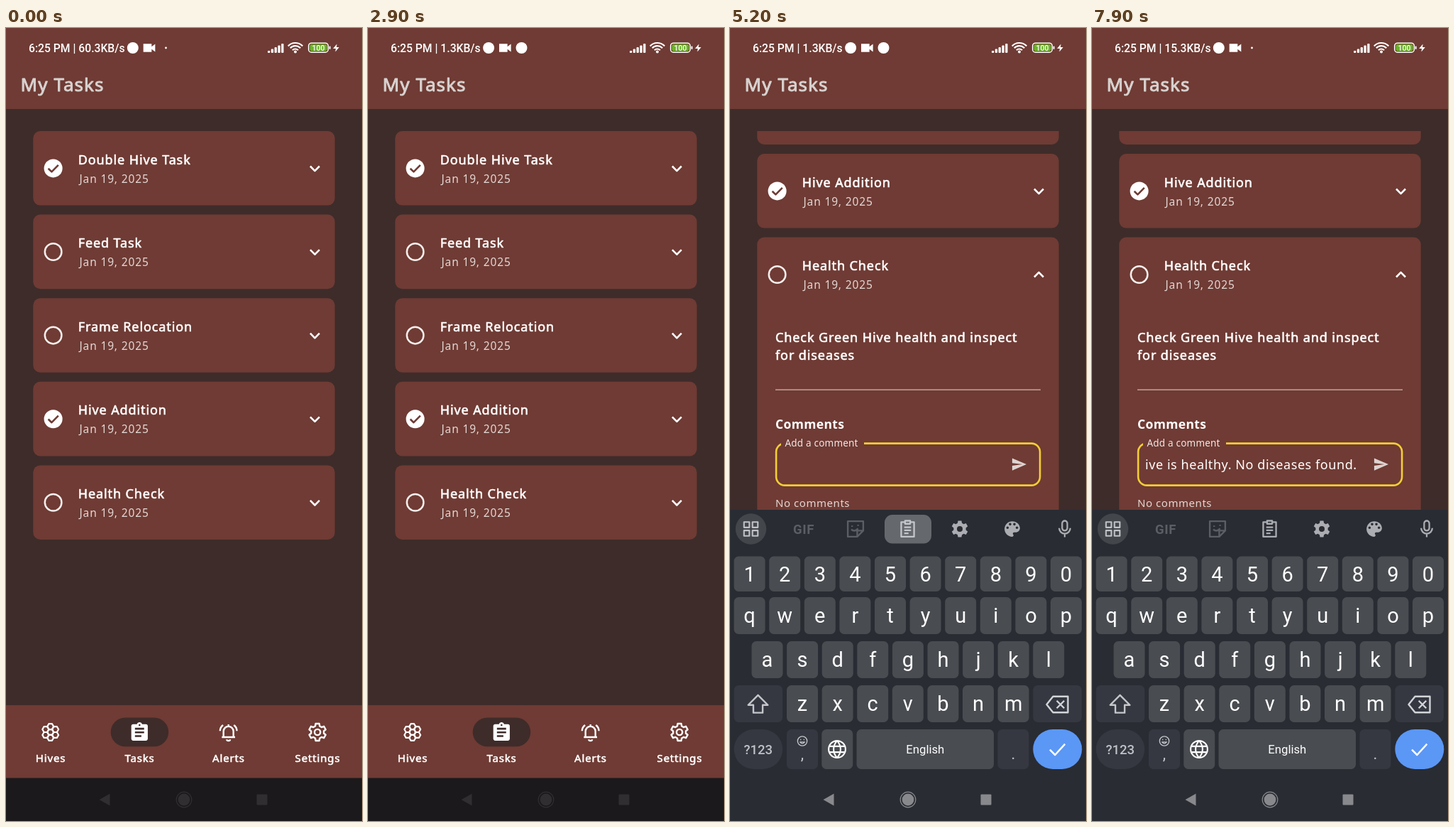
These frames come from a looping animation (502x1116 px, 8 s). An HTML page with a canvas:

```html
<!DOCTYPE html>
<html lang="en">
<head>
<meta charset="utf-8">
<title>My Tasks</title>
<style>
html, body { margin: 0; width: 100%; height: 100%; overflow: hidden; background: #3e2c2a; }
canvas { display: block; width: 502px; height: 1116px; }
</style>
</head>
<body>
<canvas id="stage"></canvas>
<script>
const W = 502, H = 1116, LOOP = 8000;
const canvas = document.getElementById('stage');
const ctx = canvas.getContext('2d');
const dpr = window.devicePixelRatio || 1;
canvas.width = W * dpr;
canvas.height = H * dpr;

const APP = '"Noto Sans", "Open Sans", sans-serif';
const SYS = 'Roboto, Inter, sans-serif';
const RUST = '#6f3b34', BROWN = '#3e2c2a', WHITE = '#fff', PALE = '#e3d7d4';
const PANEL = '#292c33', KEY = '#494c50', DARKKEY = '#353841', BLUE = '#5b97f5', GREY = '#abadb2', FAINT = '#5b5e64';
const LIST_TOP = 145, LIST_END = 953, CARD = 104.6, GAP = 13, KB_TOP = 678;

const PATHS = {
  clip: 'M19 3h-4.2C14.4 1.8 13.3 1 12 1s-2.4.8-2.8 2H5c-1.1 0-2 .9-2 2v14c0 1.1.9 2 2 2h14c1.1 0 2-.9 2-2V5c0-1.1-.9-2-2-2zm-7 0c.6 0 1 .4 1 1s-.4 1-1 1-1-.4-1-1 .4-1 1-1zm2 14H7v-2h7v2zm3-4H7v-2h10v2zm0-4H7V7h10v2z',
  clipLine: 'M9 4H4.5V21H19.5V4H15M9 2.5H15V6H9zM8 10H16M8 13.5H16M8 17H13',
  clipBare: 'M9 4H4.5V21H19.5V4H15M9 2.5H15V6.5H9z',
  bell: 'M6 18V11a6 6 0 0 1 12 0V18M4 18H20M12 2.5V5M10 20.8a2 1.6 0 0 0 4 0M1.8 10.5a9 9 0 0 1 3.7-7M22.2 10.5a9 9 0 0 0-3.7-7',
  send: 'M2 21L23 12 2 3V10l15 2-15 2z',
  palette: 'M12 3c-5 0-9 4-9 9s4 9 9 9c.8 0 1.5-.7 1.5-1.5 0-.4-.2-.7-.4-1-.2-.3-.4-.6-.4-1 0-.8.7-1.5 1.5-1.5H16c2.8 0 5-2.2 5-5 0-4.4-4-8-9-8zM6.5 12a1.5 1.5 0 1 1 0-3 1.5 1.5 0 0 1 0 3zM9.5 8a1.5 1.5 0 1 1 0-3 1.5 1.5 0 0 1 0 3zM14.5 8a1.5 1.5 0 1 1 0-3 1.5 1.5 0 0 1 0 3zM17.5 12a1.5 1.5 0 1 1 0-3 1.5 1.5 0 0 1 0 3z',
  mic: 'M9 5.5a3 3 0 0 1 6 0v5.5a3 3 0 0 1-6 0zM5.5 11a6.5 6.5 0 0 0 13 0M12 17.5V21.5',
  pencil: 'M3 17.2V21h3.8L17.8 9.9l-3.7-3.7zM20.7 7c.4-.4.4-1 0-1.4l-2.3-2.3c-.4-.4-1-.4-1.4 0l-1.9 1.8 3.8 3.8z',
  pin: 'M16 9V4h1V2H7v2h1v5c0 1.7-1.3 3-3 3v2h6v7l1 1 1-1v-7h6v-2c-1.7 0-3-1.3-3-3z',
  shift: 'M12 3L2.5 12.5H7.5V20H16.5V12.5H21.5z',
  erase: 'M8 4.5H22V19.5H8L2 12zM11.5 8.5l7 7M18.5 8.5l-7 7',
  globe: 'M2 12a10 10 0 1 1 20 0 10 10 0 0 1-20 0zM12 2c-5.5 6-5.5 14 0 20M12 2c5.5 6 5.5 14 0 20M3 8.5H21M3 15.5H21',
  smile: 'M2 12a10 10 0 1 1 20 0 10 10 0 0 1-20 0zM7 14q5 6 10 0zM8.5 8v2M15.5 8v2',
  sticker: 'M3 3H21V14L14 21H3zM21 14H14V21M8 8v1.5M15 7v1.5M7 12.5q4 3.5 8-1',
  apps: 'M3 3H10V10H3zM14 3H21V10H14zM3 14H10V21H3zM14 14H21V21H14z',
  back: 'M21 12H4M12 4L4 12L12 20',
  tick: 'M4 12.5L9.5 18L20 6.5',
  bolt: 'M14 2L4 14H11L10 22L20 10H13z',
  camera: 'M2 5H16V10L22 5.5V18.5L16 14V19H2z'
};
for (const k in PATHS) PATHS[k] = new Path2D(PATHS[k]);

const clamp = v => Math.max(0, Math.min(1, v));
const ease = p => p < .5 ? 4 * p ** 3 : 1 - (2 - 2 * p) ** 3 / 2;
const ramp = (t, from, to) => ease(clamp((t - from) / (to - from)));
const mix = (a, b, p) => a + (b - a) * p;

// heft outlines the glyphs for weights between regular and bold.
function text(s, x, y, size, { font = APP, weight = 400, heft = 0, color = WHITE, gap = 0, align = 'left' } = {}) {
  ctx.font = `${weight} ${size}px ${font}`;
  ctx.letterSpacing = gap + 'px';
  ctx.textAlign = align;
  ctx.fillStyle = ctx.strokeStyle = color;
  ctx.fillText(s, x, y);
  if (heft) {
    ctx.lineWidth = heft;
    ctx.strokeText(s, x, y);
  }
}

function box(x, y, w, h, r, color) {
  ctx.fillStyle = color;
  ctx.beginPath();
  ctx.roundRect(x, y, w, h, r);
  ctx.fill();
}

function disc(x, y, r, color, line) {
  ctx.beginPath();
  ctx.arc(x, y, r, 0, 7);
  paint(color, line);
}

function paint(color, line, path) {
  ctx.fillStyle = ctx.strokeStyle = color;
  ctx.lineWidth = line || 1;
  const args = path ? [path] : [];
  if (line) ctx.stroke(...args); else ctx.fill(...args, 'evenodd');
}

function poly(points, color, line, open) {
  ctx.beginPath();
  points.forEach(([x, y]) => ctx.lineTo(x, y));
  if (!open) ctx.closePath();
  paint(color, line);
}

// Icons live on a 24-unit grid; a line width makes them outlined.
function icon(name, x, y, size, color, line) {
  const k = size / 24;
  ctx.save();
  ctx.translate(x - size / 2, y - size / 2);
  ctx.scale(k, k);
  paint(color, line && line / k, PATHS[name]);
  ctx.restore();
}

function clipped(x, y, w, h, draw) {
  ctx.save();
  ctx.beginPath();
  ctx.rect(x, y, w, h);
  ctx.clip();
  draw();
  ctx.restore();
}

const polar = (x, y, r, a) => [x + r * Math.cos(a), y + r * Math.sin(a)];

function gear(x, y, r, color, line) {
  const pts = [];
  for (let i = 0; i < 6; i++) {
    const a = i * Math.PI / 3 + Math.PI / 6;
    for (const [k, d] of [[.74, -.36], [1, -.21], [1, .21], [.74, .36]]) pts.push(polar(x, y, r * k, a + d));
  }
  poly(pts, color, line);
  disc(x, y, r * .34, line ? color : PANEL, line);
}

function comb(x, y, r) {
  const hex = (cx, cy) => poly([0, 1, 2, 3, 4, 5].map(i => polar(cx, cy, r, i * Math.PI / 3)), WHITE, 2.2);
  hex(x, y);
  for (let i = 0; i < 6; i++) hex(...polar(x, y, r * Math.sqrt(3), Math.PI / 6 + i * Math.PI / 3));
}

function statusBar(t) {
  const speed = t < 1300 ? '60.3' : t < 5300 ? '1.3' : '15.3';
  const busy = speed === '1.3', shift = busy ? -8.7 : 0;
  text(`6:25 PM | ${speed}KB/s`, 32, 33.5, 15.7, { font: SYS, weight: 500 });
  disc(178.8 + shift, 28, 8, WHITE);
  icon('camera', 202 + shift, 28, 20, WHITE);
  if (busy) disc(216.5, 28, 8, WHITE); else disc(225.5, 28, 1.4, WHITE);

  for (let i = 0; i < 5; i++) box(369 + i * 4.8, 32 - i * 2.5, 3.3, 3 + i * 2.5, 1, WHITE);
  for (const r of [5.5, 9.8, 14]) {
    ctx.beginPath();
    ctx.arc(408, 35, r, -Math.PI * .76, -Math.PI * .24);
    paint(WHITE, 2.2);
  }
  disc(408, 33.5, 2, WHITE);
  ctx.beginPath();
  ctx.roundRect(426.7, 21.2, 27.6, 13, 4);
  paint(WHITE, 1.5);
  box(428.5, 23, 24, 9.4, 2.3, '#68b526');
  box(455.6, 25.5, 2, 4.5, 1, WHITE);
  text('100', 440.5, 31.6, 10.5, { font: SYS, weight: 500, align: 'center' });
  icon('bolt', 465.5, 28, 13, WHITE);
}

function header(t) {
  box(0, 0, W, 114, 0, RUST);
  statusBar(t);
  text('My Tasks', 20.5, 88.5, 26, { heft: .9, color: '#d8d3d1', gap: 1.1 });
}

const strong = { heft: .6, gap: .9 };
const body = { color: PALE, gap: .8 };

function rule(y) { box(64, y - .7, 374, 1.4, 0, '#d2b9ae'); }

function commentsTitle(y) { text('Comments', 64, y, 17.5, { weight: 700, gap: .35 }); }

function comment(name, time, line, y) {
  text(name, 64, y, 15, { weight: 700, gap: .3 });
  text(time, 438, y, 14, { color: '#cdb9b4', gap: .9, align: 'right' });
  text(line, 64.5, y + 35, 15, body);
}

function queenDetails(y) {
  text('Check for queen health', 64, y + 147.7, 18, strong);
  rule(y + 190);
  commentsTitle(y + 245);
  comment('Tovak', '15:36', 'Great!', y + 293.5);
  comment('You', '15:35', 'Queen is healthy.', y + 381.5);
}

function field(y, focus, pasted) {
  ctx.save();
  if (focus) {
    ctx.beginPath();
    ctx.rect(0, y - 10, W, 90);
    ctx.rect(mix(130, 72, focus), y - 9, mix(0, 117, focus), 18);
    ctx.clip('evenodd');
  }
  ctx.beginPath();
  ctx.roundRect(65.1, y + .5, 372, 59, 12);
  paint(focus > .3 ? '#f3ce35' : '#93766b', mix(1.3, 2.6, focus));
  ctx.restore();
  text('Add a comment', 77.5, y + mix(36.5, 5, focus), mix(18, 13.5, focus), { color: '#f0e8e6', gap: mix(.45, .2, focus) });
  icon('send', 407.5, y + 30, 23, '#ddd3d0');
  if (pasted) text('ive is healthy. No diseases found.', 75, y + 36.5, 18, { gap: .57 });
}

function healthDetails(y, t) {
  text('Check Green Hive health and inspect', 64, y + 147.7, 18, strong);
  text('for diseases', 64, y + 172.2, 18, strong);
  rule(y + 214.5);
  commentsTitle(y + 269.3);
  field(y + 289.5, ramp(t, 4200, 4400), t >= 6000);
  text('No comments', 64, y + 379.5, 15, { color: PALE, gap: .55 });
}

function card(task, y, h, t) {
  box(38.3, y, 425.4, h, 10, RUST);
  const cy = y + 52.4;
  if (task.done) {
    disc(66.6, cy, 13, WHITE);
    poly([[59.6, cy + .3], [64.4, cy + 5], [73.8, cy - 4.6]], RUST, 2.6, true);
  } else {
    disc(66.6, cy, 11.8, '#f6efed', 2.5);
  }
  text(task.name, 101.7, y + 46.5, 18, strong);
  text('Jan 19, 2025', 103.5, y + 72.6, 15.5, { color: PALE, gap: .85 });
  ctx.save();
  ctx.translate(435.5, cy + .3);
  ctx.rotate(Math.PI * task.open);
  poly([[-6.5, -3.2], [0, 3.4], [6.5, -3.2]], WHITE, 2.6, true);
  ctx.restore();
  if (task.open) clipped(38, y + CARD, 426, h - CARD, () => task.details(y, t));
}

function list(t, kb) {
  const tasks = [
    { name: 'Double Hive Task', done: true, full: 447, details: queenDetails, open: ramp(t, 200, 600) - ramp(t, 2000, 2400) },
    { name: 'Feed Task', open: 0 },
    { name: 'Frame Relocation', open: 0 },
    { name: 'Hive Addition', done: true, open: 0 },
    { name: 'Health Check', full: 410, details: healthDetails, open: ramp(t, 3300, 3750) }
  ];
  const heights = tasks.map(k => k.open ? mix(CARD, k.full, k.open) : CARD);
  const overflow = LIST_TOP + 4 * (CARD + GAP) + heights[4] - LIST_END;
  let y = LIST_TOP - Math.max(0, overflow) - 248.4 * kb;
  clipped(0, LIST_TOP, W, LIST_END - LIST_TOP, () => tasks.forEach((k, i) => {
    card(k, y, heights[i], t);
    y += heights[i] + GAP;
  }));
}

function tabs() {
  box(0, LIST_END, W, 103, 0, RUST);
  box(147.7, 970.5, 81.5, 40.8, 20.4, BROWN);
  comb(62.7, 991, 4.55);
  icon('clip', 188.3, 991.3, 31, WHITE);
  icon('bell', 313.7, 991, 28, WHITE, 2.4);
  gear(439.2, 991, 12.2, WHITE, 2.4);
  ['Hives', 'Tasks', 'Alerts', 'Settings'].forEach((s, i) =>
    text(s, 63 + i * 125.5, 1033.3, 15, { heft: .6, gap: .85, align: 'center' }));
  box(0, 1055.5, W, 61, 0, '#1b191b');
}

function systemKeys(lit) {
  const c = lit ? '#88898d' : '#302e30';
  poly([[131.5, 1086], [146.5, 1077.5], [146.5, 1094.5]], c);
  disc(251, 1086, 8.4, c);
  disc(251, 1086, 10.8, c, 1.2);
  box(353.5, 1078.5, 15, 15, 1, c);
}

function keyRow(chars, x, y, h) {
  [...chars].forEach((ch, i) => {
    const left = x + i * 49.6;
    box(left, y, 44, h, 6.5, KEY);
    text(ch, left + 22, y + h / 2 + (h < 51 ? 10.5 : 9.5), 29, { font: SYS, align: 'center' });
  });
}

function keyboard(pressed) {
  if (pressed) box(218, 685, 66, 40.5, 11, '#65686d');
  disc(29.5, 705, 21.7, '#43464b');
  icon('apps', 29.5, 705, 26, '#c0c2c6', 2.1);
  text('GIF', 104, 711.5, 18.5, { font: SYS, weight: 700, color: FAINT, gap: .6, align: 'center' });
  icon('sticker', 177, 705, 29, FAINT, 2.4);
  icon('clipLine', 250.5, 705, 29, pressed ? '#c4c6ca' : GREY, 2.3);
  gear(324, 705, 11.8, GREY);
  icon('palette', 398, 705, 29, GREY);
  icon('mic', 472, 705, 29, GREY, 2.3);

  keyRow('1234567890', 5.6, 743.5, 49.5);
  keyRow('qwertyuiop', 5.6, 801, 52);
  keyRow('asdfghjkl', 30.5, 863, 52);
  keyRow('zxcvbnm', 80, 925, 52);
  box(5.6, 925, 68.6, 52, 6.5, DARKKEY);
  icon('shift', 39.5, 952, 35, '#c4c6ca', 2.4);
  box(427.3, 925, 68.6, 52, 6.5, DARKKEY);
  icon('erase', 461.5, 952, 36, '#d2d4d7', 2.4);

  box(5.6, 987, 68.6, 56, 28, DARKKEY);
  text('?123', 39.8, 1022, 18.5, { font: SYS, weight: 500, color: '#bfc1c6', align: 'center' });
  box(80, 987, 44, 56, 6.5, DARKKEY);
  icon('smile', 102, 1003.5, 16, '#c4c6ca', 1.4);
  text(',', 102, 1029, 22, { font: SYS, color: '#c4c6ca', align: 'center' });
  box(129.3, 987, 44, 56, 6.5, KEY);
  icon('globe', 151, 1015, 28.5, WHITE, 2.1);
  box(178.5, 987, 193.5, 56, 6.5, KEY);
  text('English', 275.3, 1021.3, 16.7, { font: SYS, align: 'center' });
  box(377.4, 987, 44, 56, 6.5, DARKKEY);
  text('.', 399.4, 1029, 22, { font: SYS, color: '#c4c6ca', align: 'center' });
  box(427.3, 987, 69, 56, 28, BLUE);
  icon('tick', 461.7, 1015, 32, WHITE, 2.5);
}

function toggle(x, y, k) {
  ctx.beginPath();
  ctx.roundRect(x - 13 * k, y - 7.5 * k, 26 * k, 15 * k, 7.5 * k);
  paint(WHITE, 2.4 * k);
  disc(x + 5.5 * k, y, 4.2 * k, WHITE);
}

function clip(x, y, h, lines, first) {
  box(x, y, 237, h, 10, '#696a6e');
  lines.forEach((s, i) => text(s, x + 15.5, first + i * 25.4, 18, { font: SYS }));
}

function clipboard() {
  for (const x of [29.5, 408, 472]) disc(x, 705, 22, '#484a4f');
  icon('back', 29.5, 705.5, 27, WHITE, 2.6);
  text('Clipboard', 66.5, 715, 25.4, { font: SYS, weight: 500 });
  toggle(408, 705, 1);
  icon('pencil', 472, 705, 30, WHITE);
  const label = { font: SYS, weight: 500, color: '#b0b2b6', gap: .8 };
  text('RECENT', 13, 755, 15, label);
  text('TIPS', 13, 871.5, 15, label);
  clip(8, 764, 81, ['Hive is healthy. No', 'diseases found.'], 799);
  clipped(0, 860, W, 195.5, () => {
    clip(8, 881, 150, ['Welcome to Plovik', 'clipboard, any text you', 'copy will be saved here.'], 959.5);
    clip(256.7, 881, 124.5, ['Tap on a clip to paste it in', 'the text box.'], 959.5);
    clip(8, 1041.5, 60, [], 0);
    clip(256.7, 1016, 80, [], 0);
    for (const [x, y] of [[38, 910], [286, 910], [286, 1045]]) disc(x, y, 14.5, BLUE);
    toggle(38, 910, .65);
    icon('clipBare', 286, 910, 19, WHITE, 1.7);
    icon('pin', 286, 1045, 18, WHITE);
  });
}

function draw(t) {
  const kb = ramp(t, 4250, 4650);
  ctx.setTransform(dpr, 0, 0, dpr, 0, 0);
  ctx.lineJoin = 'round';
  box(0, 0, W, H, 0, BROWN);
  list(t, kb);
  header(t);
  tabs();
  if (kb) {
    ctx.save();
    ctx.translate(0, (1 - kb) * (H - KB_TOP));
    box(0, KB_TOP, W, H - KB_TOP, 0, PANEL);
    if (t >= 5300 && t < 7700) clipboard();
    else keyboard(t >= 5100 && t < 5300);
    ctx.restore();
  }
  systemKeys(kb > .5);
}

const start = performance.now();
function tick() {
  draw((performance.now() - start) % LOOP);
  requestAnimationFrame(tick);
}
tick();
</script>
</body>
</html>
```
